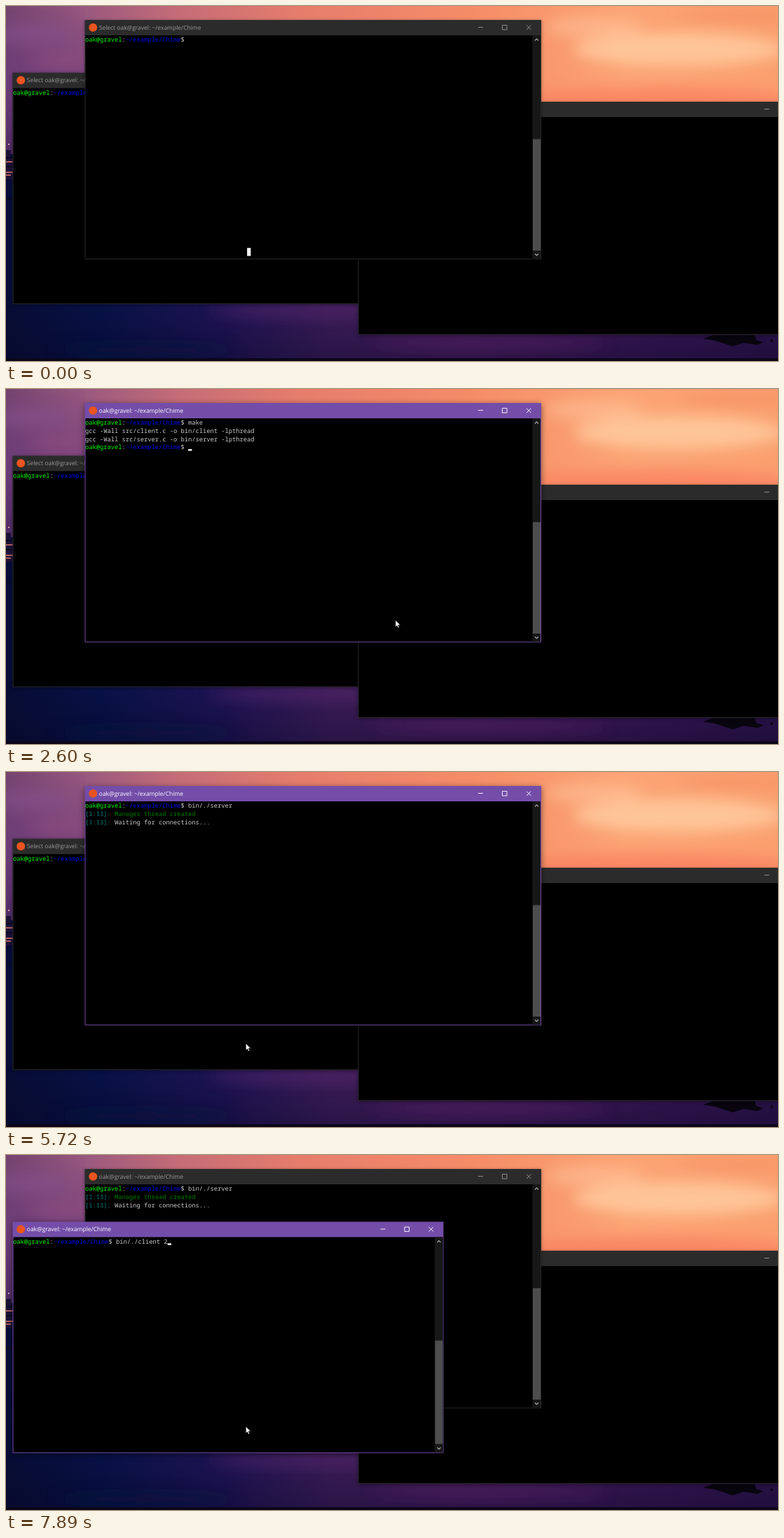
Recreate the animation shown at these times as an HTML page. Size 1102 by 508 pixels, loop 8000 ms.

```html
<!DOCTYPE html>
<html lang="en">
<head>
<meta charset="utf-8">
<title>Terminal session</title>
<style>
  html, body { margin: 0; width: 100%; height: 100%; overflow: hidden; background: #000; }
  svg { display: block; width: 100%; height: 100%; }
  text { white-space: pre; text-rendering: geometricPrecision; }
  .mono { font: 8.75px "Noto Sans Mono", monospace; fill: #ccc; }
  .title { font: 8.48px "Open Sans", sans-serif; fill: #999; }
  .user { fill: #0f0; }
  .path { fill: #0000f0; }
  .time { fill: #008080; }
  .info { fill: #008000; }
  .win { filter: drop-shadow(0 1px 2.5px rgba(0, 0, 0, .4)); }
  .frame { fill: #2b2b2b; }
  .icons { fill: none; stroke: #999; stroke-width: .9; }
  .arrows { fill: none; stroke: #aaa; stroke-width: 1.1; }
  .active { filter: drop-shadow(0 2px 4px rgba(0, 0, 0, .5)); }
  .active .frame { fill: #744da9; }
  .active .title { fill: #fff; }
  .active .icons { stroke: #fff; }
</style>
</head>
<body>
<svg viewBox="0 0 1102 508" preserveAspectRatio="none">
  <defs>
    <linearGradient id="sky">
      <stop offset="0" stop-color="#74446f"/>
      <stop offset=".1" stop-color="#98587f"/>
      <stop offset=".22" stop-color="#c46c78"/>
      <stop offset=".38" stop-color="#e67d6c"/>
      <stop offset=".6" stop-color="#f58c68"/>
      <stop offset=".8" stop-color="#fca474"/>
      <stop offset="1" stop-color="#fba070"/>
    </linearGradient>
    <linearGradient id="dusk" x2="0" y2="1">
      <stop offset="0" stop-color="#6a3a7c" stop-opacity="0"/>
      <stop offset=".5" stop-color="#6a3a7c" stop-opacity=".75"/>
      <stop offset="1" stop-color="#4c2a62"/>
    </linearGradient>
    <linearGradient id="sea">
      <stop offset="0" stop-color="#070d36"/>
      <stop offset=".12" stop-color="#07134a"/>
      <stop offset=".28" stop-color="#21165a"/>
      <stop offset=".42" stop-color="#43205f"/>
      <stop offset=".6" stop-color="#4c1f60"/>
      <stop offset=".85" stop-color="#3d1858"/>
      <stop offset="1" stop-color="#321550"/>
    </linearGradient>
    <linearGradient id="depth" x2="0" y2="1">
      <stop offset="0" stop-color="#080624" stop-opacity="0"/>
      <stop offset="1" stop-color="#080624" stop-opacity=".45"/>
    </linearGradient>
    <filter id="soft" x="-50%" y="-100%" width="200%" height="300%"><feGaussianBlur stdDeviation="10"/></filter>
  </defs>

  <rect width="1102" height="220" fill="url(#sky)"/>
  <rect width="113" height="220" fill="url(#dusk)"/>
  <g filter="url(#soft)">
    <ellipse cx="960" cy="62" rx="150" ry="24" fill="#ffd0a4" opacity=".75"/>
    <ellipse cx="840" cy="30" rx="70" ry="14" fill="#ffc49a" opacity=".6"/>
    <ellipse cx="1050" cy="14" rx="90" ry="9" fill="#f48c62" opacity=".6"/>
    <ellipse cx="930" cy="135" rx="200" ry="18" fill="#fb7f5e" opacity=".8"/>
    <ellipse cx="30" cy="40" rx="60" ry="13" fill="#87528f" opacity=".6"/>
    <ellipse cx="85" cy="78" rx="50" ry="12" fill="#95507f" opacity=".5"/>
  </g>
  <rect y="212" width="1102" height="296" fill="url(#sea)"/>
  <rect y="400" width="1102" height="108" fill="url(#depth)"/>
  <g filter="url(#soft)" opacity=".6">
    <ellipse cx="420" cy="436" rx="130" ry="9" fill="#56276c"/>
    <ellipse cx="690" cy="482" rx="170" ry="7" fill="#5b2468"/>
    <ellipse cx="200" cy="492" rx="130" ry="8" fill="#081440"/>
  </g>
  <path d="M0 206h7v10h3v32H0z" fill="#1c1238"/>
  <path d="M0 223h10M0 238h10M0 242h7" stroke="#e07c70" stroke-width="1.3"/>
  <path d="M0 217h10M0 230h10M0 276h9" stroke="#0b0a22" stroke-width="2"/>
  <circle cx="4" cy="198" r="1" fill="#ffc0c8"/>
  <path d="M995 476l14-5h60l2 7 10 3-8 4-20-3-16 5-24-8z" fill="#08050f"/>
  <circle cx="1093" cy="479" r="2" fill="#0c0618"/>
  <rect y="504" width="1102" height="4" fill="#0b0718"/>

  <g id="desk"></g>

  <circle id="click" r="9" fill="#fff400" opacity=".49"/>
  <path id="pointer" d="M0 0V9.7L2.2 7.6 3.7 11 5.3 10.3 3.8 7H6.9Z" fill="#fff" stroke="#000" stroke-width=".5"/>
</svg>
<script>
const LOOP = 8000, COL = 5.25, ROW = 11.7;
const $ = id => document.getElementById(id);
const span = (cls, text) => `<tspan class="${cls}">${text}</tspan>`;
const HOME = 'oak@gravel', DIR = '~/example/Chime';
const prompt = cmd => `${span('user', HOME)}:${span('path', DIR)}$ ${cmd}`;
const PROMPT_COLS = HOME.length + DIR.length + 3;
const log = text => span('time', '[1:13]:') + ' ' + text;

function addWindow(id, x, y, right, bottom, thumbTop, thumbBottom) {
  const mid = y + 10.5, bar = right - 12.5;
  $('desk').insertAdjacentHTML('beforeend', `
    <g id="${id}" class="win">
      <rect class="frame" x="${x}" y="${y}" width="${right - x}" height="${bottom - y}"/>
      <rect x="${x + 1}" y="${y + 22}" width="${right - x - 2}" height="${bottom - y - 23}"/>
      <rect x="${bar}" y="${y + 22}" width="11.5" height="${bottom - y - 23}" fill="#171717"/>
      <rect x="${bar + .5}" y="${thumbTop}" width="11" height="${thumbBottom - thumbTop}" fill="#4d4d4d"/>
      <path class="arrows" d="M${bar + 3.5} ${y + 29.5}l2.5-2.5 2.5 2.5M${bar + 3.5} ${bottom - 8}l2.5 2.5 2.5-2.5"/>
      <path class="icons" d="M${right - 90} ${mid}h7M${right - 55.5} ${mid - 3}h6.5v6.5h-6.5zM${right - 21} ${mid - 3}l6.5 6.5m0-6.5l-6.5 6.5"/>
      <circle cx="${x + 11.7}" cy="${mid + .2}" r="6" fill="#e95420"/>
      <text class="title" x="${x + 20.3}" y="${mid + 3.3}"></text>
      <g class="mono"></g>
      <rect class="caret" width="5.3" fill="#f2f2f2"/>
    </g>`);
  const el = $(id), lines = el.querySelector('.mono');
  const title = el.querySelector('.title'), caret = el.querySelector('.caret');
  let shown = '';
  return {
    el,
    // cursor: [column, row] underline; block: [column, row] selected cell
    show({ rows, cursor, block, active }) {
      el.classList.toggle('active', active);
      title.textContent = (block ? 'Select ' : '') + `${HOME}: ${DIR}`;
      const html = rows.map((row, i) =>
        `<text x="${x + .6}" y="${y + 31.2 + i * ROW}">${row}</text>`).join('');
      if (html !== shown) lines.innerHTML = shown = html;
      const cell = block || cursor;
      caret.style.display = cell ? '' : 'none';
      if (!cell) return;
      caret.setAttribute('x', x + .6 + cell[0] * COL);
      caret.setAttribute('y', y + 22 + cell[1] * ROW + (block ? 0 : 8.8));
      caret.setAttribute('height', block ? 11.5 : 2.6);
    }
  };
}

const client = addWindow('client', 9.5, 95.5, 624.5, 426.5, 265.5, 413.5);
const spare = addWindow('spare', 502.5, 137, 1172.5, 470.5, 300, 450);
const server = addWindow('server', 112.5, 20, 764, 362.5, 190.5, 350);
spare.show({ rows: [], active: false });

// Number of characters typed by time t, from [time, length] pairs
const typed = (t, keys) => keys.reduce((n, [at, len]) => t >= at ? len : n, 0);
const typing = (t, text, keys) => {
  const cmd = text.slice(0, typed(t, keys));
  return { rows: [prompt(cmd)], cursor: [PROMPT_COLS + cmd.length, 0] };
};

const MAKE_KEYS = [[1500, 1], [1600, 2], [1700, 3], [1800, 4]];
const SERVER_KEYS = [[3380, 1], [3530, 2], [3650, 3], [3780, 4], [3930, 5],
  [4030, 6], [4140, 7], [4250, 9], [4480, 10], [4560, 11], [4640, 12]];
const CLIENT_KEYS = [[6400, 1], [6550, 2], [6690, 3], [6830, 4], [6980, 5],
  [7120, 6], [7270, 7], [7340, 8], [7480, 10], [7600, 12], [7740, 13], [7890, 14]];
const compile = name => `gcc -Wall src/${name}.c -o bin/${name} -lpthread`;

function serverState(t) {
  if (t < 1500) return { rows: [prompt('')], block: [44, 26] };
  if (t < 1900) return typing(t, 'make', MAKE_KEYS);
  if (t < 3070) {
    const rows = [prompt('make'), compile('client')];
    if (t >= 2300) rows.push(compile('server'));
    const row = rows.length;
    if (t >= 2600) rows.push(prompt(''));
    return { rows, cursor: [t >= 2600 ? PROMPT_COLS : 0, row] };
  }
  if (t < 4790) return typing(t, 'bin/./server', SERVER_KEYS);
  return {
    rows: [prompt('bin/./server'), log(span('info', 'Manager thread created')), log('Waiting for connections...')],
    cursor: t < 5320 ? [0, 4] : null
  };
}

function clientState(t) {
  return t < 6260 ? { rows: [prompt('')], block: [75, 0] } : typing(t, 'bin/./client 2', CLIENT_KEYS);
}

// Stepped quadratic path
function glide(t, start, step, count, from, bend, to) {
  const u = Math.min(1, (Math.floor((t - start) / step) + 1) / count);
  return from.map((a, i) => (1 - u) ** 2 * a + 2 * u * (1 - u) * bend[i] + u * u * to[i]);
}

const ENTRY = [759.5, 477], FIRST = [556, 330.8], SECOND = [342.4, 388.5];
function pointerAt(t) {
  if (t < 70) return [-50, -50];
  if (t < 140) return [830, 492];
  if (t < 890) return ENTRY;
  if (t < 5170) return glide(t, 890, 70, 5, ENTRY, [660, 400], FIRST);
  return glide(t, 5170, 78.5, 8, FIRST, [450, 571], SECOND);
}

function draw(now) {
  const t = now % LOOP, clientFront = t >= 5950;
  server.show({ ...serverState(t), active: t >= 1280 && !clientFront });
  client.show({ ...clientState(t), active: clientFront });
  const order = clientFront ? [spare, server, client] : [client, spare, server];
  if ($('desk').lastElementChild !== order[2].el) $('desk').append(...order.map(w => w.el));

  const [x, y] = pointerAt(t);
  $('pointer').setAttribute('transform', `translate(${x} ${y})`);
  const pressed = (t >= 1280 && t < 1430) || (t >= 5950 && t < 6100);
  $('click').style.display = pressed ? '' : 'none';
  $('click').setAttribute('transform', `translate(${x - .8} ${y - .4})`);
  $('pointer').setAttribute('opacity', pressed ? .85 : 1);
  requestAnimationFrame(draw);
}
draw(performance.now());
</script>
</body>
</html>
```
